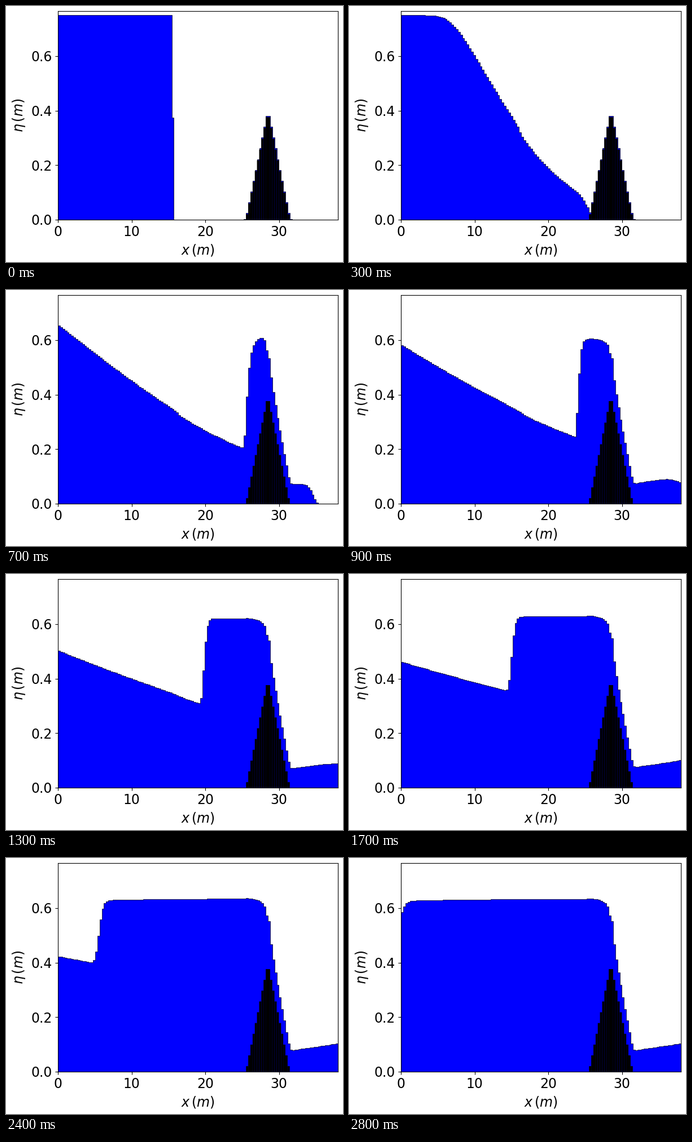
Animation of 597 by 454 pixels, one loop 2.9 s. Source, as a matplotlib script:

```python
import numpy as np
import matplotlib.pyplot as plt
from matplotlib.animation import FuncAnimation

W, H, DPI = 597, 454, 100
FRAMES, INTERVAL = 29, 100

# Channel open at both ends, with a triangular hump on the bed
LENGTH, CELLS = 38.0, 128
DX = LENGTH / CELLS
G, MANNING, CFL, DRY = 9.81, 0.0125, 0.5, 1e-3

nodes = np.linspace(0, LENGTH, CELLS + 1)


def cell_mean(values):
    return (values[:-1] + values[1:]) / 2


bed = cell_mean(np.maximum(0, 0.4 * (1 - np.abs(nodes - 28.5) / 3)))


def velocity(h, q):
    return np.where(h > DRY, q / np.maximum(h, DRY), 0)


def hll(hl, ul, hr, ur):
    """Mass and momentum flux between two shallow-water states."""
    cl, cr = np.sqrt(G * hl), np.sqrt(G * hr)
    c_mid = np.abs((cl + cr) / 2 + (ul - ur) / 4)
    u_mid = (ul + ur) / 2 + cl - cr
    sl = np.where(hl > DRY, np.minimum(ul - cl, u_mid - c_mid), ur - 2 * cr)
    sr = np.where(hr > DRY, np.maximum(ur + cr, u_mid + c_mid), ul + 2 * cl)
    gap = np.maximum(sr - sl, 1e-9)

    def blend(a, b, fa, fb):
        mid = (sr * fa - sl * fb + sl * sr * (b - a)) / gap
        flux = np.where(sl >= 0, fa, np.where(sr <= 0, fb, mid))
        return np.where((hl <= DRY) & (hr <= DRY), 0, flux)

    ql, qr = hl * ul, hr * ur
    return (blend(hl, hr, ql, qr),
            blend(ql, qr, ql * ul + G * hl**2 / 2, qr * ur + G * hr**2 / 2))


def step(h, q, dt):
    u = velocity(h, q)
    drag = G * MANNING**2 / np.cbrt(np.maximum(h, DRY))
    slow = drag * np.abs(u)
    q = np.where(h > DRY,
                 q - dt * slow * u / (1 + 2 * dt * slow / np.maximum(h, DRY)),
                 0)

    # Ghost cells, then states rebuilt over the higher bed of each pair
    z = np.pad(bed, 1, mode="edge")
    eta = np.pad(h, 1, mode="edge") + z
    u = np.pad(velocity(h, q), 1, mode="edge")
    z_face = np.maximum(z[:-1], z[1:])
    hl = np.maximum(0, eta[:-1] - z_face)
    hr = np.maximum(0, eta[1:] - z_face)
    z_left = np.minimum(z_face, eta[:-1])
    z_right = np.minimum(z_face, eta[1:])

    mass, mom = hll(hl, u[:-1], hr, u[1:])
    push = G * (hl[1:] + hr[:-1]) / 2 * (z_left[1:] - z_right[:-1])
    h = np.maximum(0, h - dt / DX * np.diff(mass))
    q = q - dt / DX * (np.diff(mom) + push)
    return h, np.where(h > DRY, q, 0)


def simulate():
    """Water surface once per second after the dam breaks."""
    h = cell_mean(np.where(nodes <= 15.5, 0.75, 0.0))
    q = np.zeros(CELLS)
    surfaces = [h + bed]
    for _ in range(FRAMES - 1):
        left = 1.0
        while left > 1e-9:
            speed = np.max(np.abs(velocity(h, q)) + np.sqrt(G * h))
            dt = min(left, CFL * DX / speed)
            h, q = step(h, q, dt)
            left -= dt
        surfaces.append(h + bed)
    return surfaces


surfaces = simulate()

plt.rcParams.update({"font.family": "DejaVu Sans", "font.size": 17})
fig = plt.figure(figsize=(W / DPI, H / DPI), dpi=DPI, facecolor="white")
ax = fig.add_axes([92 / W, 75.2 / H, 496 / W, 369.6 / H])
ax.set_xlim(0, LENGTH)
ax.set_ylim(0, 0.765)
ax.set_xticks([0, 10, 20, 30])
ax.set_yticks([0, 0.2, 0.4, 0.6])
ax.set_xlabel(r"$x\,(m)$", labelpad=5.5)
ax.set_ylabel(r"$\eta\,(m)$", labelpad=5.5)

water = ax.stairs(surfaces[0], nodes, fill=True, facecolor="blue",
                  edgecolor="black", linewidth=0.5, zorder=1)
# Unsnapped bars let thin seams of water show between them
ax.bar(nodes[:-1], np.maximum(0, bed - 0.004), DX, align="edge",
       color="black", linewidth=0, snap=False, zorder=1.5)


def draw(i):
    water.set_data(surfaces[i])
    return water,


anim = FuncAnimation(fig, draw, frames=FRAMES, interval=INTERVAL,
                     repeat=True, repeat_delay=0)
plt.show()
```
